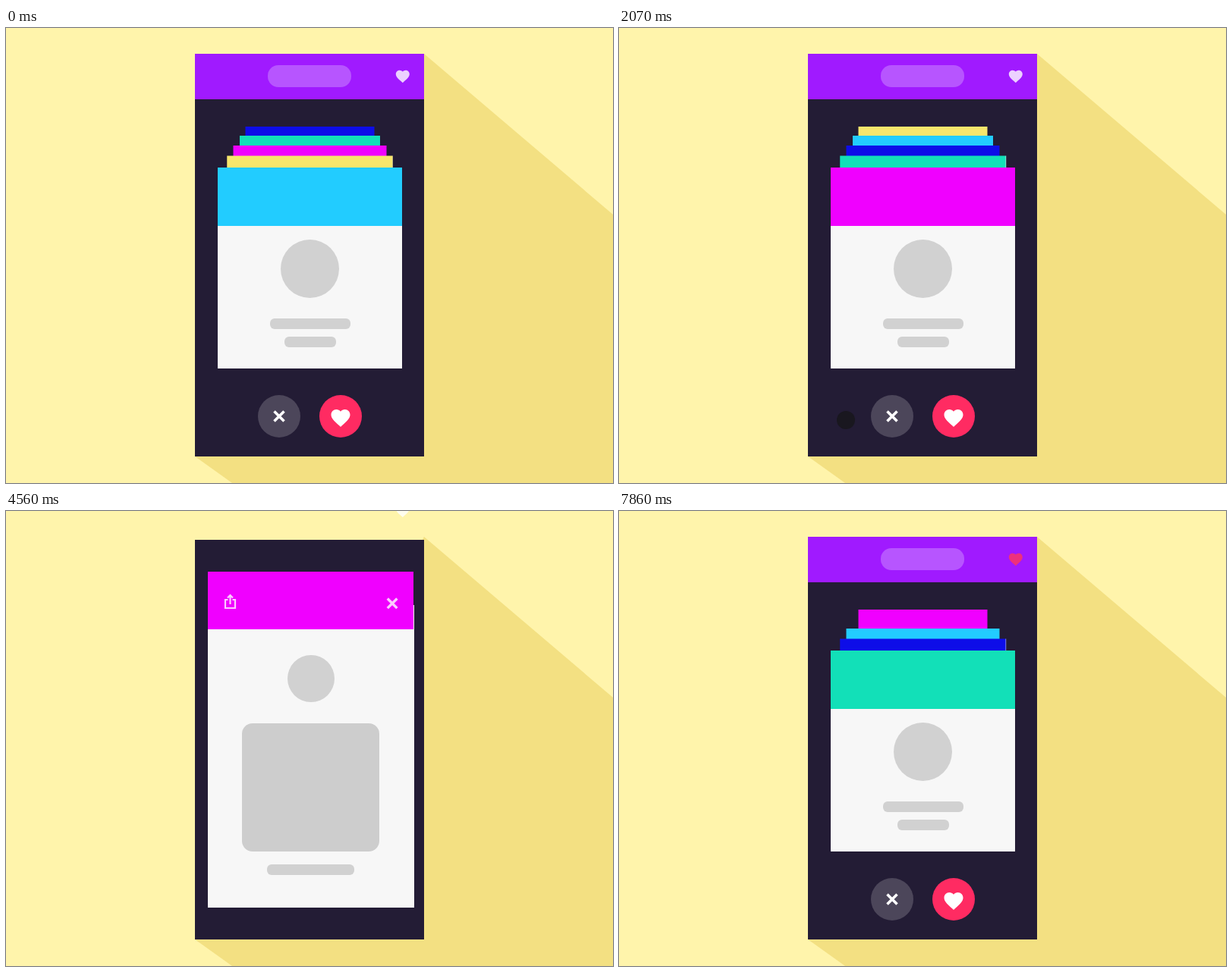
Recreate the animation shown at these times as an HTML page. Size 800 px wide and 600 px high, loop 7.92 s.

```html
<!DOCTYPE html>
<html lang="en">
<head>
<meta charset="utf-8">
<title>Card stack</title>
<style>
html, body { margin: 0; width: 100%; height: 100%; overflow: hidden; }
#stage { position: relative; width: 800px; height: 600px; overflow: hidden; background: #fff4ab; }
#stage div, #stage svg { position: absolute; }
svg { overflow: visible; }
.back { left: 0; top: 0; }
#phone { left: 249px; top: 38px; width: 302px; height: 527px; background: #231c35; overflow: hidden; }
#bar { left: 249px; top: 34px; width: 302px; height: 60px; background: #a01aff; }
#bar div { left: 96px; top: 15px; width: 110px; height: 29px; border-radius: 14px; background: #b755ff; }
#like { left: 512.2px; top: 52.5px; width: 21.6px; height: 21.6px; fill: rgba(255, 255, 255, .8); }
#buttons { left: 0; top: 0; width: 302px; height: 527px; }
.button { width: 56px; height: 56px; top: 446px; border-radius: 50%; }
.no { left: 82.5px; background: #4c465a; }
.yes { left: 163.5px; background: #ff2b62; }
.button svg { left: 0; top: 0; width: 56px; height: 56px; }
#cards { left: 0; top: 0; isolation: isolate; }
.card { left: 278.5px; top: 184px; width: 243px; height: 265px; transform-origin: 50% 0; }
.body { background: #f7f7f7; }
.pic, .line { background: #d1d1d1; }
.pic { border-radius: 50%; }
.line { border-radius: 6px; }
#icons { left: -278.5px; top: -184px; width: 800px; height: 600px; opacity: 0;
  fill: none; stroke: rgba(255, 255, 255, .8); }
#touch { left: -75px; top: -75px; width: 150px; height: 150px; border-radius: 50%; opacity: 0; }
</style>
</head>
<body>
<div id="stage">
  <svg class="back" width="800" height="600"><path fill="#f3e082" d="M551 34L800 246V600H298L249 565Z"/></svg>
  <div id="phone">
    <div id="buttons">
      <div class="button no"><svg><path d="M21.5 21.5l13 13m0-13l-13 13" stroke="#fff" stroke-width="3.6"/></svg></div>
      <div class="button yes"><svg><path class="heart" fill="#fff" transform="translate(13 15.3) scale(1.25)"/></svg></div>
    </div>
  </div>
  <div id="bar"><div></div></div>
  <svg id="like" viewBox="0 0 24 24"><path class="heart"/></svg>
  <div id="cards"></div>
  <div id="touch"></div>
</div>
<script>
const LOOP = 7920, EPS = 0.02;
const EASE = 'cubic-bezier(.45,0,.55,1)';
const QUAD_IN = 'cubic-bezier(.333,0,.667,.333)';
const HEART = 'M12 21.35l-1.45-1.32C5.4 15.36 2 12.28 2 8.5 2 5.42 4.42 3 7.5 3c1.74 0 3.41.81 4.5 2.09' +
  'C13.09 3.81 14.76 3 16.5 3 19.58 3 22 5.42 22 8.5c0 3.78-3.4 6.86-8.55 11.54z';
const $ = id => document.getElementById(id);
const sheet = document.head.appendChild(document.createElement('style'));
let count = 0;

// Turns [ms, css, easing] stops into a looping keyframe animation.
function track(el, stops) {
  const name = 'k' + count++;
  const rows = [...stops, [LOOP, stops[stops.length - 1][1]]].map(([ms, css, ease = 'linear']) =>
    `${(ms / LOOP * 100).toFixed(5)}%{${css};animation-timing-function:${ease}}`);
  sheet.textContent += `@keyframes ${name}{${rows.join('')}}\n`;
  const own = el.style.animation;
  el.style.animation = (own ? own + ',' : '') + `${name} ${LOOP}ms linear infinite`;
}

// Switches between the stack view and the detail view.
const OPEN = [2340, 2640], CLOSE = [5250, 5550];
const toggle = (el, closed, open, during = []) => track(el, [
  [0, closed], [OPEN[0], closed, EASE], [OPEN[1], open], ...during,
  [CLOSE[0], open, EASE], [CLOSE[1], closed]
]);

document.querySelectorAll('.heart').forEach(p => p.setAttribute('d', HEART));

toggle($('bar'), 'transform:translateY(0)', 'transform:translateY(-96px)');
toggle($('like'), 'transform:translateY(0)', 'transform:translateY(-64px)');
toggle($('buttons'), 'transform:translateY(0)', 'transform:translateY(86px)');
track($('like'), [[0, 'fill:rgba(255,255,255,.8)'], [6650, 'fill:rgba(255,255,255,.8)'], [6900, 'fill:#ee307c']]);

// Cards
const box = (x, y, w, h) => `left:${x - 278.5}px;top:${y - 184}px;width:${w}px;height:${h}px`;
const PARTS = [
  ['body', [278.5, 184, 243, 265], [265, 123.5, 272, 399.5]],
  ['pic', [361.5, 279, 77, 77], [370, 190, 62, 62]],
  ['line', [347, 383, 106, 14], [310, 280, 181, 168.5]],
  ['line', [366, 407, 68, 14], [343, 466, 115.5, 14]],
  ['head', [278.5, 184, 243, 77], [265.5, 79.5, 271, 76.5]]
];
const SLOTS = [[184, 243], [168.5, 218.5], [155, 202], [142, 185], [130, 170]];
const LAST = SLOTS.length - 1;
const ADVANCES = [[615, 840], [1515, 1740], [6960, 7200]];

const slot = i => `transform:translateY(${SLOTS[i][0] - 184}px) scale(${SLOTS[i][1] / 243})`;
const tilt = deg => 'transform:translateY(132.5px) perspective(1060px) ' +
  `translateY(132.5px) rotateX(${-deg}deg) translateY(-265px)`;

function fall(start, end) {
  return [[start, slot(0)], [start + EPS, tilt(0), QUAD_IN], [end, tilt(90)]];
}

// Shrinks along a curve into the heart in the top bar.
function fly(start, end) {
  const stops = [];
  for (let i = 0; i <= 12; i++) {
    const q = i / 12, p = q * q;
    stops.push([start + q * (end - start),
      `transform:translate(${123 * p ** 2.35}px,${-115 * p}px) scale(${1 - p})`]);
  }
  return stops;
}

const EXITS = [[fall, 315, 615], [fall, 1215, 1515], [fly, 6350, 6650]];

function makeCard(color, index) {
  const card = $('cards').appendChild(document.createElement('div'));
  card.className = 'card';
  const parts = PARTS.map(([cls, closed]) => {
    const el = card.appendChild(document.createElement('div'));
    el.className = cls;
    el.style.cssText = box(...closed);
    return el;
  });
  parts[4].style.background = color;

  const moves = [[0, slot(index)]];
  let at = index;
  ADVANCES.forEach(([from, to], n) => {
    if (at === 0) {
      const [exit, start, end] = EXITS[n];
      moves.push(...exit(start, end), [end + EPS, slot(LAST)]);
      const z = 10 - index;
      track(card, [[0, `z-index:${z}`], [end, `z-index:${z}`], [end + EPS, `z-index:${5 - n}`]]);
      at = LAST;
    } else {
      moves.push([from, slot(at), EASE], [to, slot(--at)]);
    }
  });
  track(card, moves);
  card.style.zIndex = 10 - index;
  return { card, parts };
}

const cards = ['#22ccff', '#f7e66c', '#f000ff', '#12e0b8', '#0d0de8'].map(makeCard);

track(cards[1].card, [[0, 'opacity:1'], [7860 - EPS, 'opacity:1'], [7860, 'opacity:0']]);

// The third card opens; its head unrolls over the body after the share tap.
const detail = cards[2];
PARTS.forEach(([, closed, open], i) => {
  const full = box(265, 79.5, 272, 443.5);
  const unroll = [[3570, box(...open), EASE], [3870, full], [4050, full, EASE], [4560, box(...open)]];
  const extra = ['', '', ';border-radius:14px;background:#cdcdcd', '', ''][i];
  const base = i === 2 ? ';border-radius:6px;background:#d1d1d1' : '';
  toggle(detail.parts[i], box(...closed) + base, box(...open) + extra, i === 4 ? unroll : []);
});
detail.card.insertAdjacentHTML('beforeend',
  `<svg id="icons"><path stroke-width="3.4" d="M501.8 115.5l12.6 12.6m0-12.6l-12.6 12.6"/>
  <path stroke-width="2.2" d="M291.5 117H288V128H301V117H297.5M294.5 123V112M291 114.5L294.5 111L298 114.5"/></svg>`);
toggle($('icons'), 'opacity:0', 'opacity:1');

// Touches: [appear, press, x, y]
const TAPS = [
  [90, 240, 359, 511], [1020, 1140, 359, 511], [2070, 2220, 400, 316],
  [3120, 3371, 292, 119], [4980, 5130, 513, 121], [6150, 6267, 442, 515]
];
const SPREAD = 350, DARK = 'background:#161616', LIGHT = 'background:#fff';
const spot = (x, y, r) => `transform:translate(${x}px,${y}px) scale(${r / 75})`;
const touch = [[0, 'opacity:0']];
for (const [appear, press, x, y] of TAPS) {
  const at = t => press + t * SPREAD;
  touch.push(
    [appear - EPS, 'opacity:0'],
    [appear, `opacity:.7;${DARK};${spot(299, 517, 12)}`, EASE],
    [press, spot(x, y, 12)],
    [at(0.08), DARK],
    [at(0.22), 'opacity:.7'],
    [at(0.35), LIGHT],
    [at(1), `opacity:0;${LIGHT};${spot(x, y, 75)}`]
  );
}
track($('touch'), touch);
</script>
</body>
</html>
```
